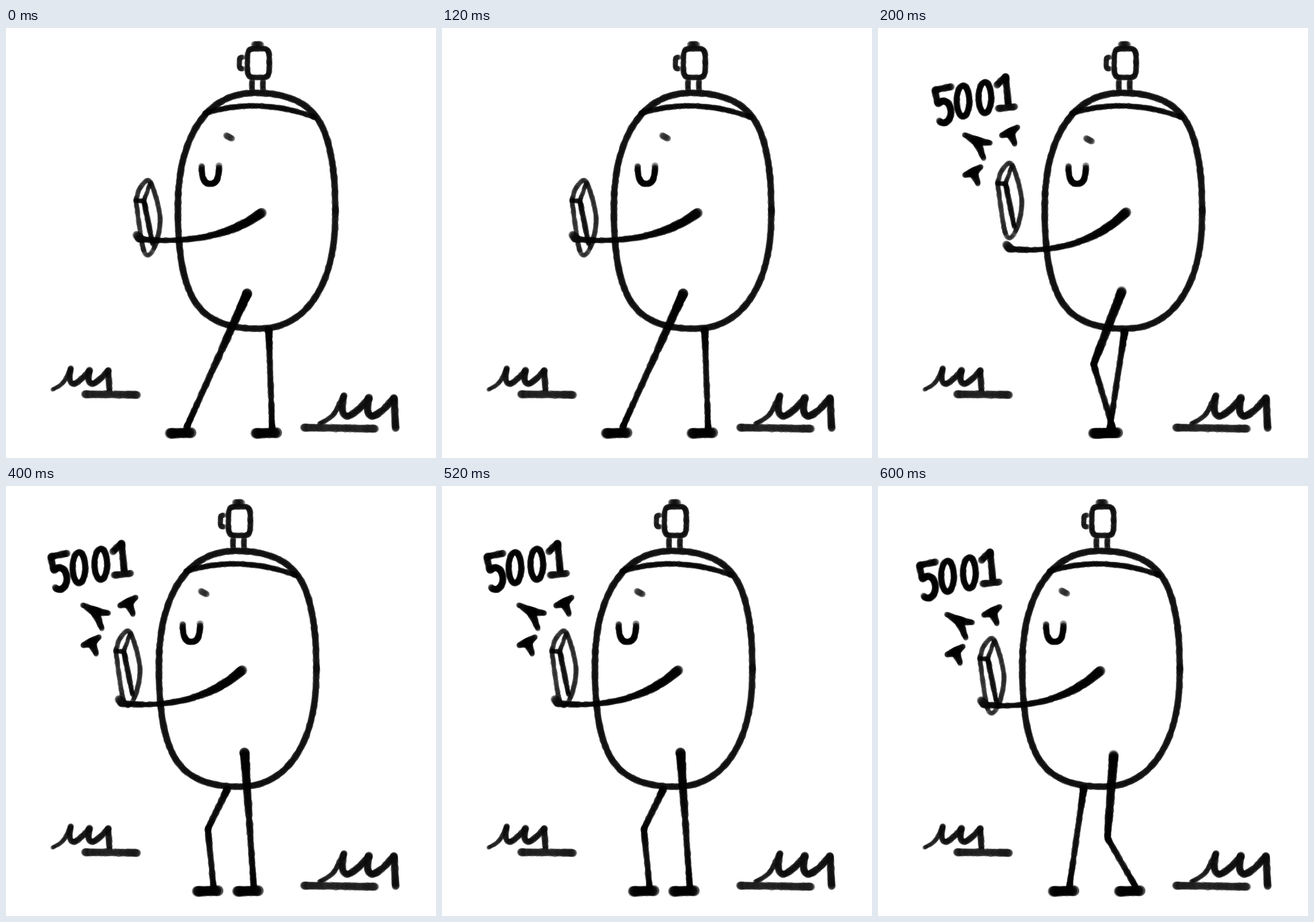
Write an HTML page with a canvas that moves like this. It is 748 by 748 pixels and loops after 0.8 s.

```html
<!DOCTYPE html>
<html lang="en">
<head>
<meta charset="utf-8">
<title>Step counter walk</title>
<style>
  html, body { margin: 0; width: 100%; height: 100%; overflow: hidden; background: #fff; }
  canvas { display: block; width: 748px; height: 748px; }
</style>
</head>
<body>
<canvas id="stage" width="748" height="748"></canvas>
<script>
const SIZE = 748, STEP = 200, FLOOR = 705;
const BLACK = 3, INK = 14, SOFT = 30;
const screen = document.getElementById('stage').getContext('2d');
let ctx;

function random(seed) {
  return () => {
    seed = (seed * 1664525 + 1013904223) >>> 0;
    return seed / 4294967296;
  };
}

// Catmull-Rom through flat x,y pairs; a doubled point makes a corner.
function spline(flat) {
  const n = flat.length / 2, out = [];
  const at = i => {
    i = Math.max(0, Math.min(n - 1, i));
    return [flat[2 * i], flat[2 * i + 1]];
  };
  for (let i = 0; i < n - 1; i++) {
    const [a, b, c, d] = [at(i - 1), at(i), at(i + 1), at(i + 2)];
    const parts = Math.ceil(Math.hypot(c[0] - b[0], c[1] - b[1]));
    for (let k = 0; k < parts; k++) {
      const t = k / parts;
      out.push([0, 1].map(j => b[j] + t / 2 * (c[j] - a[j]
        + t * (2 * a[j] - 5 * b[j] + 4 * c[j] - d[j]
        + t * (3 * (b[j] - c[j]) + d[j] - a[j])))));
    }
  }
  out.push(at(n - 1));
  return out;
}

// Charcoal brush: overlapping translucent dabs with a ragged edge.
function brush(flat, widths, tone = INK) {
  const rnd = random(flat.length * 97 + 11);
  const ws = [].concat(widths), pts = spline(flat);
  pts.forEach(([x, y], i) => {
    const u = i / Math.max(1, pts.length - 1) * (ws.length - 1);
    const k = Math.floor(u), next = ws[Math.min(k + 1, ws.length - 1)];
    const w = ws[k] + (next - ws[k]) * (u - k);
    const g = Math.round(tone * (0.6 + rnd() * 0.8));
    ctx.fillStyle = `rgba(${g},${g},${g},.3)`;
    ctx.beginPath();
    ctx.arc(x + rnd() - 0.5, y + rnd() - 0.5, w / 2 * (0.92 + rnd() * 0.32), 0, 7);
    ctx.fill();
  });
}

// Superellipse arc; power(angle) or a constant sets how square it is.
function ring(cx, cy, rx, ry, w, tone, power = 2, from = 0, to = 2 * Math.PI) {
  const flat = [], steps = 48;
  const push = (v, e) => Math.sign(v) * Math.abs(v) ** e;
  for (let i = 0; i <= steps; i++) {
    const a = from + (to - from) * i / steps;
    const e = 2 / (power.call ? power(a) : power);
    flat.push(cx + rx * push(Math.cos(a), e), cy + ry * push(Math.sin(a), e));
  }
  brush(flat, w, tone);
}

function curve(x0, y0, cx, cy, x1, y1, w, tone) {
  const flat = [], mix = (a, b, c, t) => (1 - t) ** 2 * a + 2 * t * (1 - t) * b + t * t * c;
  for (let t = 0; t <= 1; t += 0.125) flat.push(mix(x0, cx, x1, t), mix(y0, cy, y1, t));
  brush(flat, w, tone);
}

function shifted([dx, dy], draw) {
  ctx.save();
  ctx.translate(dx, dy);
  draw();
  ctx.restore();
}

// Three blades of grass, measured from the tip of the first.
function tuft(x, y, s) {
  const flat = [], to = (dx, dy) => flat.push(x + dx * s, y + dy * s);
  to(-32, 37);
  to(-14, 25);
  for (let i = 0; i < 3; i++) {
    const bx = 32.5 * i, tip = i ? 3 : 0;
    to(bx, tip);
    to(bx, tip);
    if (i < 2) [[-2, 20], [5, 27], [20, 17]].forEach(([dx, dy]) => to(bx + dx, dy));
  }
  to(67, 43);
  brush(flat, [6, 9, 10, 10, 10].map(w => w * Math.sqrt(s)), INK);
}

function ground() {
  tuft(113, 592, 1);
  brush([137,637, 228,638], 12, SOFT);
  tuft(588, 639, 1.34);
  brush([518,695, 642,697], 12, SOFT);
}

function body() {
  const squareness = a => 2.3 + 0.9 * Math.max(0, -Math.cos(a) * Math.sin(a));
  ring(436, 318, 137, 205, 10.5, INK, squareness);
  curve(346, 148, 440, 120, 537, 155, 9, BLACK);
  ring(355.5, 240, 15, 31, 10, BLACK, 2.6, 0, Math.PI);
  // head camera
  ring(439, 61, 19, 25, 9, INK, 5);
  brush([432,29, 443,29], 11);
  ring(412, 61, 6, 10, 8, SOFT, 4, Math.PI / 2, Math.PI * 1.5);
  for (const x of [428, 447]) brush([x,92, x,107], 9);
}

function phone() {
  brush([208,270, 216,247, 233,238, 250,301, 239,354, 222,358, 208,270], 8, SOFT);
  brush([208,270, 222,271, 222,271, 237,346], [7, 9, 9, 7], BLACK);
  brush([222,270, 233,240], 7);
}

function count() {
  brush([127,102, 99,108, 99,108, 104,132], 11, BLACK);
  ring(114, 146, 13, 19, 11, BLACK, 2, -2.3, 2.2);
  for (const i of [0, 1]) ring(148 + 38 * i, 127 - 6 * i, 11, 27, 10, BLACK);
  brush([207,99, 222,84, 222,84, 227,137], 11, BLACK);
  brush([209,140, 238,137], 11);
}

// A burst mark: three tapering prongs.
function fork(x, y, size, tilt) {
  [[2.85 + tilt, 0.75], [tilt - 0.66, 0.75], [1.19, 1]].forEach(([a, r]) =>
    brush([x, y, x + size * r * Math.cos(a), y + size * r * Math.sin(a)], [15, 8], BLACK));
}

function sparks() {
  fork(172, 197, 32, 0.78);
  fork(230, 182, 22, 0);
  fork(166, 251, 22, 0);
}

function arm([sx, sy], [hx, hy]) {
  curve(sx, sy, sx - 78, hy + 13, hx, hy, [15, 13, 10, 9, 10], BLACK);
  brush([hx - 3, hy - 7, hx + 5, hy], 13);
}

// Points run hip, optional knee, ankle.
function leg(points, width) {
  const [hip, ...rest] = points, ankle = points[points.length - 1];
  const flat = [...hip];
  rest.forEach(p => flat.push(...p, ...p));
  brush(flat, [width, width - 2, 10, 10], BLACK);
  const x = ankle[0] - 10;
  brush([x - 19, FLOOR, x + 18, FLOOR - 1], 16, BLACK);
}

const poses = [
  {
    x: 0, brow: [0, 0], phone: [18, 30], shoulder: [445, 321], hand: [230, 367],
    front: [[420, 461], [314, 695]], back: [[457, 525], [463, 698]]
  },
  {
    x: -9, brow: [-21, 5], phone: [0, 0], count: [0, 0], shoulder: [432, 320], hand: [226, 384],
    front: [[424, 458], [375, 585], [409, 697]], back: [[429, 528], [403, 697]]
  },
  {
    x: -33, brow: [-44, -4], phone: [-17, 17], count: [-21, 15], shoulder: [411, 320], hand: [199, 378],
    front: [[415, 463], [431, 697]], back: [[385, 527], [351, 597], [361, 697]]
  },
  {
    x: -48, brow: [-64, -5], phone: [-31, 30], count: [-27, 30], shoulder: [387, 321], hand: [182, 380],
    front: [[410, 468], [399, 612], [448, 697]], back: [[358, 525], [333, 697]]
  }
];

function render(p) {
  const sheet = document.createElement('canvas');
  sheet.width = sheet.height = SIZE;
  ctx = sheet.getContext('2d');
  ctx.fillStyle = '#fff';
  ctx.fillRect(0, 0, SIZE, SIZE);
  ground();
  shifted([p.x, 0], body);
  shifted(p.brow, () => brush([383,187, 393,192], 10, 40));
  shifted(p.phone, phone);
  if (p.count) {
    shifted(p.count, count);
    shifted([p.phone[0], p.phone[1] * 1.25], sparks);
  }
  arm(p.shoulder, p.hand);
  leg(p.back, 12);
  leg(p.front, 15);
  return sheet;
}

const sheets = poses.map(render);

function play() {
  const step = Math.floor(performance.now() / STEP) % sheets.length;
  screen.drawImage(sheets[step], 0, 0);
  requestAnimationFrame(play);
}
play();
</script>
</body>
</html>
```
